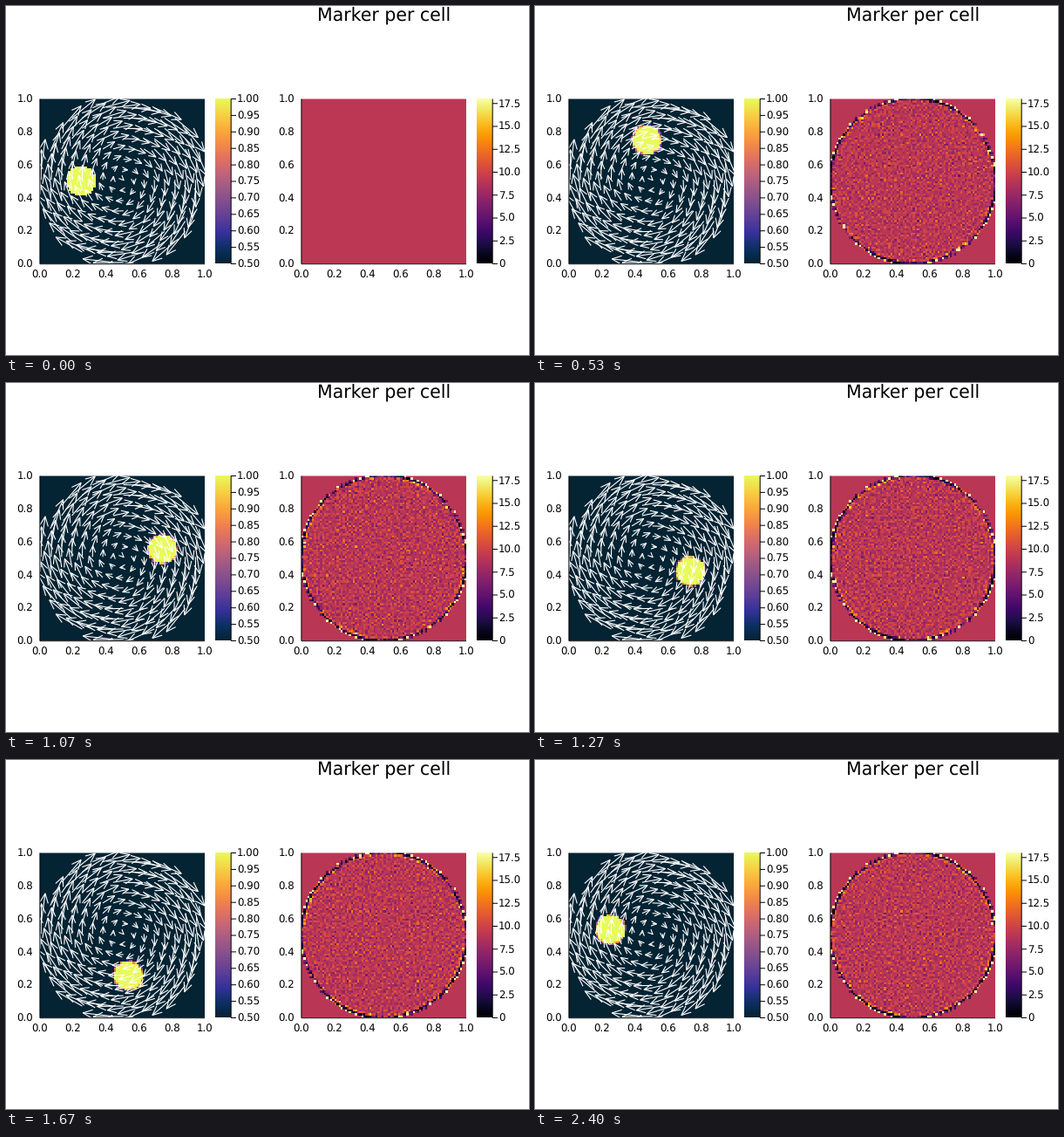
Animation of 600 by 400 pixels, one loop 2.47 s. Source, as a matplotlib script:

```python
import numpy as np
import matplotlib.pyplot as plt
from matplotlib.animation import FuncAnimation
from matplotlib.collections import LineCollection
from matplotlib.colors import LinearSegmentedColormap
from matplotlib.patches import Rectangle

plt.rcParams["text.hinting"] = "none"

PX = 0.72                      # points per pixel at 100 dpi
N = 80                         # cells per side
SIDE, TOP, BOTTOM = 189, 106, 295
LEFT_X, RIGHT_X = 39, 339
STATES, TICK_MS, LOOP_MS = 37, 10, 2470
SUBSTEPS = 12

THERMAL = LinearSegmentedColormap.from_list("thermal", [
    (r / 255, g / 255, b / 255) for r, g, b in (
        (4, 35, 51), (13, 48, 100), (53, 50, 155), (93, 62, 153),
        (126, 77, 143), (158, 89, 135), (193, 100, 121), (225, 113, 97),
        (246, 139, 69), (251, 173, 60), (246, 211, 70), (232, 250, 91))])

rng = np.random.default_rng(4)

# ---- staggered velocity: clockwise rotation, zero outside the circle ----
edge = np.linspace(0, 1, N + 1)
mid = (edge[:-1] + edge[1:]) / 2


def masked(x, y, speed):
    gx, gy = np.meshgrid(x, y)
    return np.where(np.hypot(gx - 0.5, gy - 0.5) < 0.5, speed(gx, gy), 0.0)


VX = masked(edge, mid, lambda x, y: y - 0.5)
VY = masked(mid, edge, lambda x, y: 0.5 - x)


def sample(field, x, y, ox, oy):
    """Bilinear interpolation on a grid shifted by (ox, oy) cells."""
    rows, cols = field.shape
    u = np.clip(x * N - ox, 0, cols - 1 - 1e-9)
    v = np.clip(y * N - oy, 0, rows - 1 - 1e-9)
    i, j = u.astype(int), v.astype(int)
    u, v = u - i, v - j
    low = (1 - u) * field[j, i] + u * field[j, i + 1]
    high = (1 - u) * field[j + 1, i] + u * field[j + 1, i + 1]
    return (1 - v) * low + v * high


def velocity(x, y):
    return sample(VX, x, y, 0, 0.5), sample(VY, x, y, 0.5, 0)


def keep(p):
    return np.clip(p, 0, 1 - 1e-9)


def advect(x, y, angle):
    """Midpoint steps through the given rotation angle."""
    dt = angle / SUBSTEPS
    for _ in range(SUBSTEPS):
        vx, vy = velocity(x, y)
        vx, vy = velocity(x + vx * dt / 2, y + vy * dt / 2)
        x, y = keep(x + vx * dt), keep(y + vy * dt)
    return x, y


def simulate():
    """Return phase and marker count per cell for every state."""
    m = 3 * N
    jx, jy = 0.5 + 0.8 * (rng.random((2, m, m)) - 0.5)
    col, row = np.meshgrid(np.arange(m), np.arange(m))
    x, y = ((col + jx) / m).ravel(), ((row + jy) / m).ravel()
    cx, cy = (np.floor(x * N) + 0.5) / N, (np.floor(y * N) + 0.5) / N
    phase = (np.hypot(cx - 0.25, cy - 0.5) < 0.092).astype(float)

    dx, dy = x - 0.5, y - 0.5
    r = np.hypot(dx, dy)
    core, rim = r <= 0.478, (r > 0.478) & (r < 0.522)
    dx, dy = dx[core], dy[core]
    turns = np.radians(np.minimum(10.46 * np.arange(STATES), 367.5))

    out = []
    for k, a in enumerate(turns):
        if k:
            x[core] = 0.5 + dx * np.cos(a) + dy * np.sin(a)
            y[core] = 0.5 - dx * np.sin(a) + dy * np.cos(a)
            x[rim], y[rim] = advect(x[rim], y[rim], a - turns[k - 1])
        cell = (y * N).astype(int) * N + (x * N).astype(int)
        count = np.bincount(cell, minlength=N * N)
        share = np.bincount(cell, phase, N * N) / np.maximum(count, 1)
        out.append(((0.5 + 0.5 * share).reshape(N, N), count.reshape(N, N)))
    return out


states = simulate()

# ---- stage in pixel coordinates ----
fig = plt.figure(figsize=(6, 4), dpi=100, facecolor="white")
ax = fig.add_axes([0, 0, 1, 1])
ax.set_axis_off()


def label(x, y, text, ha, size=11.73):
    ax.text(x, y, text, ha=ha, va="baseline", fontsize=size * PX,
            family="DejaVu Sans", color="black")


def line(x, y, color="black", alpha=1.0):
    ax.plot(x, y, color=color, lw=PX, alpha=alpha, snap=False,
            solid_capstyle="butt", zorder=3)


def picture(data, x, width, cmap, lo, hi):
    return ax.imshow(data, extent=(x, x + width, BOTTOM, TOP), origin="lower",
                     cmap=cmap, vmin=lo, vmax=hi, aspect="auto",
                     interpolation="nearest", zorder=1)


def panel(x, data, cmap, lo, hi, ticks, fmt):
    image = picture(data, x, SIDE, cmap, lo, hi)
    line([x, x + SIDE], [TOP + 0.5] * 2, "white", 0.5)
    line([x, x + SIDE], [BOTTOM + 0.7] * 2)
    line([x - 0.1] * 2, [TOP + 0.5, BOTTOM + 0.7])
    for i in range(6):
        text, d = f"{i / 5:.1f}", SIDE * i / 5
        label(x + d, 312, text, "center")
        label(x - 8, BOTTOM + 5 - d, text, "right")

    bar = x + SIDE + 12
    picture(np.linspace(lo, hi, 256)[:, None], bar, 18, cmap, lo, hi)
    line([bar + 18.2] * 2, [TOP + 0.5, BOTTOM + 0.5])
    for t in ticks:
        ty = BOTTOM + 0.5 - SIDE * (t - lo) / (hi - lo)
        line([bar + 18, bar + 24], [ty, ty])
        label(bar + 25, ty + 4.3, fmt(t), "left")
    return image


def draw_arrows():
    grid = 0.5 / N + np.arange(0, N, 5) / N
    lines, dots = [], []
    for px in grid:
        for py in grid:
            dx, dy = px - 0.5, py - 0.5
            tail = np.array([LEFT_X + px * SIDE, BOTTOM - py * SIDE])
            if np.hypot(dx, dy) >= 0.5:
                dots.append(tail)
                continue
            step = 0.37 * SIDE * np.array([dy, dx])
            tip, length = tail + step, np.hypot(*step)
            back = np.arctan2(-step[1], -step[0])
            head = 6 + 0.17 * length
            barbs = [tip + head * np.array([np.cos(back + s), np.sin(back + s)])
                     for s in (-0.42, 0.42)]
            lines += [[tail, tip], [barbs[0], tip, barbs[1]]]
    arrows = LineCollection(lines, colors="white", linewidths=1.1 * PX, zorder=2)
    ax.add_collection(arrows)
    arrows.set_clip_path(Rectangle((LEFT_X, TOP), SIDE, SIDE,
                                   transform=ax.transData))
    ax.scatter(*np.transpose(dots), s=0.5, marker="s", color="white",
               alpha=0.6, linewidths=0, zorder=2)


phase_image = panel(LEFT_X, states[0][0], THERMAL, 0.5, 1.0,
                    np.linspace(0.5, 1, 11), "{:.2f}".format)
count_image = panel(RIGHT_X, states[0][1], "inferno", 0, 18,
                    np.arange(0, 18, 2.5), lambda t: f"{t:.1f}" if t else "0")
draw_arrows()
label(434, 18, "Marker per cell", "center", 20.53)
ax.set_xlim(0, 600)
ax.set_ylim(400, 0)


def update(i):
    # 15 states per second, switching on the nearest 10 ms tick
    phase, count = states[(6 * i + 3) // 40]
    phase_image.set_data(phase)
    count_image.set_data(count)
    return phase_image, count_image


anim = FuncAnimation(fig, update, frames=LOOP_MS // TICK_MS, interval=TICK_MS,
                     repeat=True, repeat_delay=0, blit=False)
plt.show()
```
